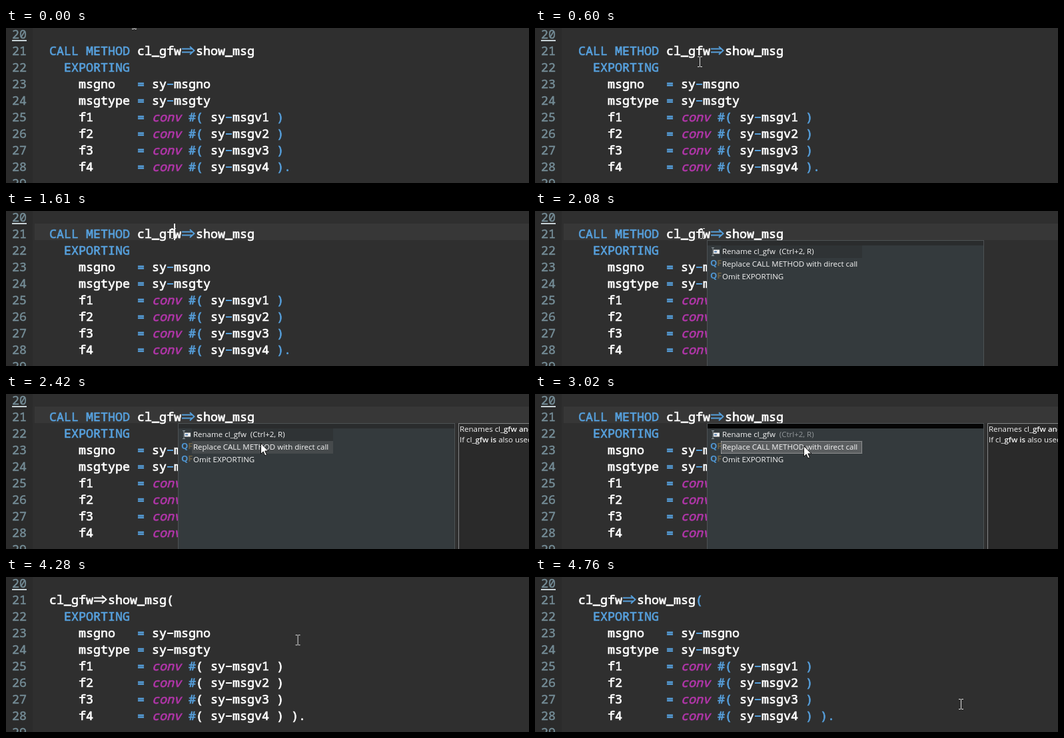
Recreate the animation shown at these times as an HTML page. Size 785x234 px, loop 5420 ms.

```html
<!DOCTYPE html>
<html lang="en">
<head>
<meta charset="utf-8">
<title>Replace CALL METHOD</title>
<style>
:root { --loop: 5420ms step-end infinite; --blue: #569fdb; }
html, body { margin: 0; width: 100%; height: 100%; overflow: hidden; background: #2f2f2f; }
#stage { position: relative; width: 785px; height: 234px; overflow: hidden; background: #2f2f2f; }
#stage > *, #popup > *, #pointer > * { position: absolute; }

/* Editor */
#gutter { left: 0; top: 0; width: 40px; height: 234px; background: #2b2b2b; }
#current { left: 43px; top: 19px; width: 742px; height: 25px; background: #373737; animation: line var(--loop); }
#mark { left: 9px; top: 18px; width: 22px; height: 1.5px; background: #c9d3d7; }
#caret { left: 252px; top: 19px; width: 2px; height: 25px; background: #f4f4f4; animation: caret var(--loop); }
pre { margin: 0; color: #fff; font: 18.333px/25px "Noto Sans Mono", "DejaVu Sans Mono", monospace;
  -webkit-text-stroke: .7px currentColor; font-variant-ligatures: none; }
#numbers { left: 9px; top: -4px; color: #748c96; -webkit-text-stroke-width: .5px; }
.code { left: 65px; top: 21px; }
.k, .o { color: var(--blue); }
.c { color: #b036a8; font-style: italic; }
.dash { -webkit-text-fill-color: transparent; -webkit-text-stroke: 0;
  background: linear-gradient(currentColor, currentColor) 1px 13px / 9px 2px no-repeat; }
pre svg { width: 22px; height: 25px; vertical-align: top; fill: none; stroke: currentColor; stroke-width: 1.9; }
#before { animation: before var(--loop); }
#after { animation: after var(--loop); }
#after .o { animation: recolor var(--loop); }

/* Quick fix list */
#popup, #details { font: 11.5px/18px "Open Sans", "Noto Sans", sans-serif; color: #f5f5f5; white-space: pre; }
#popup { left: 258px; top: 44px; width: 414px; height: 200px; background: #343a3d;
  border: 1px solid #4d5254; animation: popup var(--loop); }
#strip { left: 0; top: 0; width: 414px; height: 7px; animation: strip var(--loop); }
.row { left: 20px; height: 18px; padding: 0 6px 0 2px; }
#first, #hover, #chosen { box-sizing: border-box; left: 20px; width: 212px; height: 19px; }
#first { top: 7px; background: #2f3335; animation: first var(--loop); }
#hover { top: 26px; background: #464a4c; animation: hover var(--loop); }
#chosen { top: 26px; background: #5b5e60; border: 1px dotted #c4c4c4; animation: chosen var(--loop); }
#keys { animation: keys var(--loop); }
.qf { left: 4px; font-size: 13px; font-weight: 700; color: #4f94cf; }
.qf i { font-style: normal; color: #6d6045; }
#details { left: 679px; top: 44px; width: 120px; height: 200px; padding: 0 0 0 1px; line-height: 15.5px;
  background: #2a2a2a; border: 1px solid #858788; animation: details var(--loop); }
#details b { font-weight: 600; }

/* Pointer */
#pointer { left: 0; top: 0; animation: move var(--loop); }
#beam { left: 0; top: 0; animation: beam var(--loop); }
#arrow { left: 2px; top: 7px; animation: arrow var(--loop); }

@keyframes line { 0%, 60.88% { visibility: hidden } 28.96% { visibility: visible } }
@keyframes caret {
  0%, 38.37%, 53.13% { visibility: hidden }
  28.96%, 48.15% { visibility: visible }
}
@keyframes before { 0% { visibility: visible } 60.88%, 100% { visibility: hidden } }
@keyframes after { 0% { visibility: hidden } 60.88%, 100% { visibility: visible } }
@keyframes recolor { 0% { color: #fff } 81.91%, 100% { color: #569fdb } }
@keyframes popup { 0%, 59.4%, 100% { visibility: hidden } 33.39% { visibility: visible } }
@keyframes strip { 0% { background: #2a2c2d } 54.42%, 100% { background: #050505 } }
@keyframes first { 0%, 54.42%, 100% { visibility: hidden } 33.39% { visibility: visible } }
@keyframes details { 0%, 59.4%, 100% { visibility: hidden } 43.35% { visibility: visible } }
@keyframes hover { 0%, 54.42%, 100% { visibility: hidden } 44.64% { visibility: visible } }
@keyframes chosen { 0%, 59.4%, 100% { visibility: hidden } 54.42% { visibility: visible } }
@keyframes keys { 0% { color: #f5f5f5 } 54.42%, 100% { color: #92979a } }
@keyframes beam { 0%, 59.4%, 100% { visibility: visible } 42.06% { visibility: hidden } }
@keyframes arrow { 0%, 59.4%, 100% { visibility: hidden } 42.06% { visibility: visible } }
@keyframes move {
  0% { transform: translate(189px, -14px) }
  2.39% { transform: translate(152px, -29px) }
  6.08% { transform: translate(152px, -29px); animation-timing-function: steps(3, jump-both) }
  11.06% { transform: translate(244px, 43px) }
  14.39% { transform: translate(244px, 43px); animation-timing-function: steps(2, jump-both) }
  17.34% { transform: translate(97px, 52px); animation-timing-function: steps(3, jump-end) }
  23.24% { transform: translate(250px, 34px) }
  24.53% { transform: translate(250px, 34px); animation-timing-function: steps(2, jump-both) }
  27.49% { transform: translate(248px, 26px) }
  42.06% { transform: translate(248px, 26px); animation-timing-function: steps(2, jump-both) }
  44.64% { transform: translate(380px, 67px) }
  47.04% { transform: translate(380px, 67px); animation-timing-function: steps(2, jump-both) }
  50.73% { transform: translate(395px, 70px) }
  53.13% { transform: translate(395px, 70px); animation-timing-function: steps(2, jump-both) }
  55.71% { transform: translate(401px, 71px) }
  78.96% { transform: translate(401px, 71px); animation-timing-function: steps(6, jump-both) }
  87.82%, 100% { transform: translate(636px, 184px) }
}
</style>
</head>
<body>
<div id="stage">
  <div id="gutter"></div>
  <div id="current"></div>
  <pre id="numbers">20
21
22
23
24
25
26
27
28
29</pre>
  <div id="mark"></div>
  <pre class="code" id="before"></pre>
  <pre class="code" id="after"></pre>
  <div id="caret"></div>

  <div id="popup">
    <div id="strip"></div>
    <div id="first"></div>
    <svg style="left:5px;top:10px" width="14" height="13">
      <path d="M4 3.5h9v6H4z" fill="#f0f0f0"/>
      <path d="M1 .5h4M3 .5v12M1 12.5h4" stroke="#8d979d" fill="none"/>
      <path d="M5 6.5h4" stroke="#4a77a8" stroke-width="2"/>
    </svg>
    <div class="row" style="top:7px">Rename cl_gfw  <span id="keys">(Ctrl+2, R)</span></div>
    <div id="hover"></div>
    <div id="chosen"></div>
    <div class="qf" style="top:24px">Q<i>F</i></div>
    <div class="row" style="top:26px">Replace CALL METHOD with direct call</div>
    <div class="qf" style="top:43px">Q<i>F</i></div>
    <div class="row" style="top:45px">Omit EXPORTING</div>
  </div>
  <div id="details">Renames cl<b>_gfw an</b>d its references
If cl<b>_gfw is</b> also used elsewhere</div>

  <div id="pointer">
    <svg id="beam" width="7" height="17">
      <path d="M0 .5h3M4 .5h3M3.5 1v14M0 15.5h3M4 15.5h3" stroke="#dedede" fill="none"/>
    </svg>
    <svg id="arrow" width="14" height="21">
      <path d="M.5 .5v16l3.7-3.5 2.6 6 2.6-1.1-2.6-5.9h5z" fill="#fff" stroke="#111"/>
    </svg>
  </div>
</div>
<script>
const arrow = '<svg class="o"><path d="M1 10.5H17M1 15.5H17M13 7l6.5 6-6.5 6"/></svg>';

function wrap(token) {
  if (token === '=>') return arrow;
  if (token === 'conv') return '<span class="c">conv</span>';
  if (token === '-') return '<span class="o dash">-</span>';
  const type = /[().]/.test(token) ? 'o' : 'k';
  return `<span class="${type}">${token}</span>`;
}

function show(id, call, end) {
  const args = ['msgno   = sy-msgno', 'msgtype = sy-msgty'];
  for (let i = 1; i <= 4; i++) args.push(`f${i}      = conv #( sy-msgv${i} )`);
  const text = [call, '  EXPORTING', ...args.map(a => '    ' + a)].join('\n') + end;
  document.getElementById(id).innerHTML =
    text.replace(/CALL METHOD|EXPORTING|conv|=>|[-=#().]/g, wrap);
}

show('before', 'CALL METHOD cl_gfw=>show_msg', '.');
show('after', 'cl_gfw=>show_msg(', ' ).');
</script>
</body>
</html>
```
